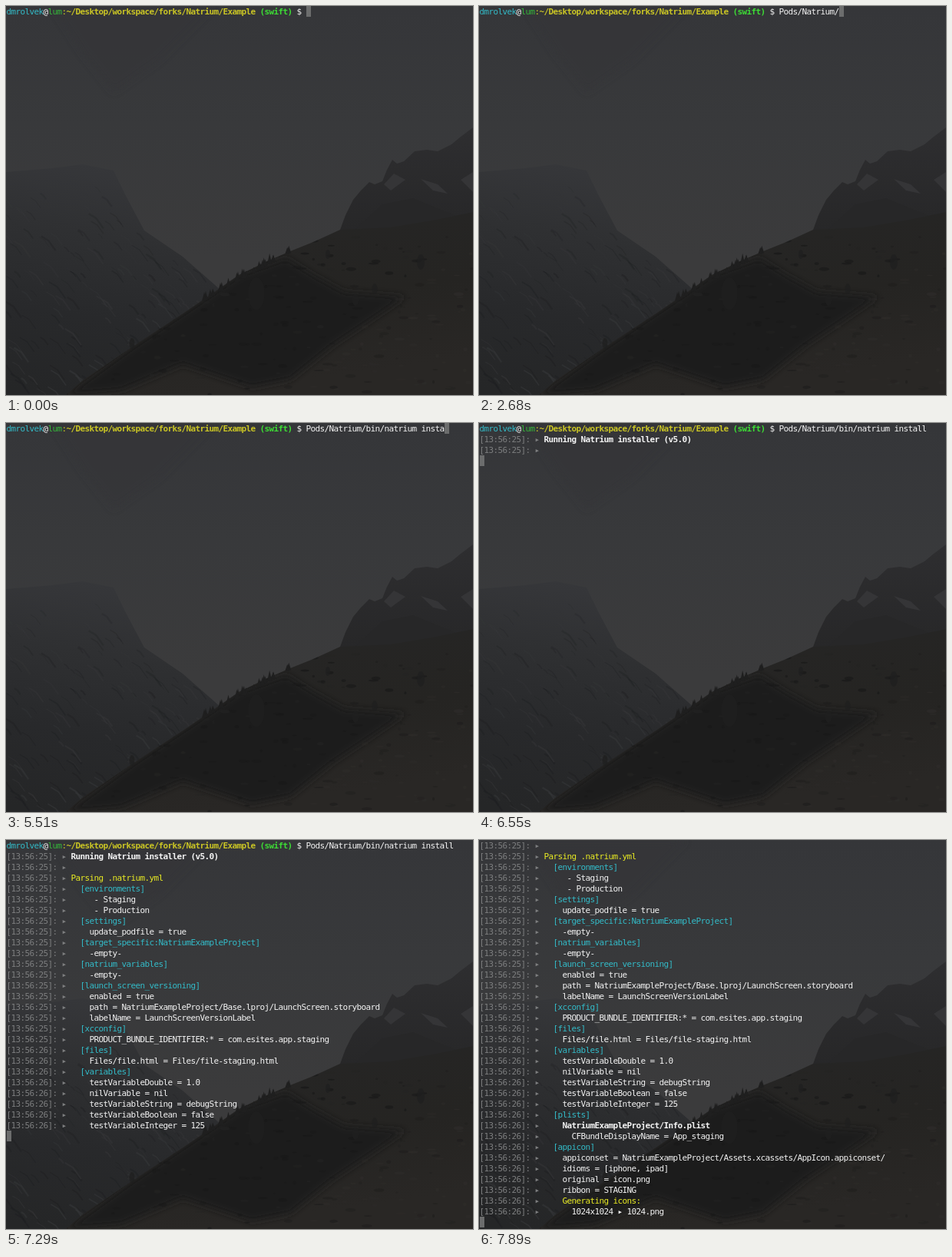
An HTML page for the animation above (8000 ms loop, 608x506 px).

```html
<!DOCTYPE html>
<html lang="en">
<head>
<meta charset="utf-8">
<title>Terminal session</title>
<style>
html, body { margin: 0; width: 100%; height: 100%; overflow: hidden; background: #38393b; }
svg { display: block; width: 608px; height: 506px; }
text { font: 11px "DejaVu Sans Mono", "Liberation Mono", monospace; white-space: pre; }
.bold { font-weight: bold; }
</style>
</head>
<body>
<svg viewBox="0 0 608 506">
  <defs>
    <linearGradient id="sky" x2="0" y2="1">
      <stop offset="0" stop-color="#353639"/>
      <stop offset=".3" stop-color="#38393b"/>
      <stop offset=".65" stop-color="#3b3b3c"/>
    </linearGradient>
    <linearGradient id="haze" x1=".4" y1="0" x2=".25" y2="1">
      <stop offset="0" stop-color="#36373a"/>
      <stop offset=".3" stop-color="#2f3032"/>
      <stop offset=".65" stop-color="#28292b"/>
      <stop offset="1" stop-color="#252627"/>
    </linearGradient>
    <linearGradient id="peak" x2="0" y2="1">
      <stop offset="0" stop-color="#2e2e30"/>
      <stop offset="1" stop-color="#262627"/>
    </linearGradient>
    <linearGradient id="slope" x2=".3" y2="1">
      <stop offset="0" stop-color="#262626"/>
      <stop offset=".6" stop-color="#252422"/>
      <stop offset="1" stop-color="#292725"/>
    </linearGradient>
    <filter id="soft" x="-20%" y="-20%" width="140%" height="140%"><feGaussianBlur stdDeviation="5"/></filter>
    <clipPath id="leftClip"><path d="M0 232L60 226L130 230L155 250L180 292L230 326L280 370L85 506H0Z"/></clipPath>
    <clipPath id="slopeClip"><path id="ridge" d="M78 506L100 487L165 443L200 420L232 399L270 373L303 350L340 332L370 319L400 307L435 291L500 288L560 278L608 268V506Z"/></clipPath>
  </defs>
  <rect width="608" height="506" fill="url(#sky)"/>
  <path d="M60 0L100 62L140 112L200 70L270 0Z" fill="#343539" opacity=".6" filter="url(#soft)"/>
  <path d="M0 216L60 211L100 206L140 214L155 245L180 292L230 326L280 370L200 430L85 506H0Z" fill="url(#haze)"/>
  <g id="streaks" clip-path="url(#leftClip)" fill="none"></g>
  <path d="M608 158L592 170L580 180L562 189L548 187L532 189L518 202L509 205L503 200L496 213L490 228L480 232L473 229L462 240L452 252L442 272L435 291L430 310L608 300Z" fill="url(#peak)"/>
  <path d="M540 225L562 232L575 244L556 240ZM592 226L608 216V242ZM492 232L505 218L520 226L501 240Z" fill="#353537"/>
  <path d="M455 290L490 258L530 250L608 282V300H450Z" fill="#272728"/>
  <use href="#ridge" fill="url(#slope)"/>
  <g clip-path="url(#slopeClip)">
    <path d="M78 506L165 443L270 373L303 350L365 328L400 350L440 372L520 378L470 412L425 442L370 486L320 496L230 466L150 500Z" fill="#1b1b1b" filter="url(#soft)"/>
    <g id="scrub"></g>
  </g>
  <g id="trees" fill="#1f1f1f"></g>
  <rect id="cursor" width="6" height="14" fill="#6c6d6d"/>
  <g id="screen"></g>
</svg>
<script>
const NS = 'http://www.w3.org/2000/svg';
const LOOP = 8000, CELL = 6, ROW = 14, VISIBLE = 36;
const WHITE = '#f4f4f4', GREY = '#7d7e7f', CYAN = '#33bbc8', YELLOW = '#eaec23';
const $ = id => document.getElementById(id);

function add(parent, tag, attrs) {
  const el = document.createElementNS(NS, tag);
  for (const key in attrs) el.setAttribute(key, attrs[key]);
  return parent.appendChild(el);
}

// Scenery
let seed = 7;
const rand = (a, b) => {
  seed = (seed * 16807) % 2147483647;
  return a + (b - a) * seed / 2147483647;
};

for (let i = 0; i < 230; i++) {
  const x = rand(-10, 260), y = rand(235, 506), len = rand(5, 22);
  add($('streaks'), 'path', {
    d: `M${x} ${y}l${len * .5} ${len * .3}l${len * .5} ${len * .7}`,
    stroke: rand(0, 1) < .55 ? '#1f2022' : '#363739',
    'stroke-width': rand(.6, 2.4),
    opacity: rand(.15, .3) + (y - 235) / 700
  });
}
for (let i = 0; i < 240; i++) {
  const x = rand(120, 608), y = rand(300, 506);
  const dark = x + (y - 400) * .9 < 480;
  add($('scrub'), 'ellipse', {
    cx: x, cy: y, rx: rand(1.5, 7), ry: rand(.7, 2.5),
    fill: dark ? (rand(0, 1) < .7 ? '#181818' : '#242423') : (rand(0, 1) < .4 ? '#1f1e1d' : '#2e2c2a'),
    opacity: rand(.3, .7)
  });
}
for (let i = 0; i < 26; i++) {
  const x = rand(255, 372), base = 378 - (x - 262) * .56, h = rand(4, 11);
  add($('trees'), 'path', { d: `M${x - 3} ${base + 3}L${x} ${base - h}L${x + 3} ${base + 3}Z` });
}
for (const [x, y, h] of [[326, 395, 42], [540, 343, 20], [419, 329, 12], [164, 446, 14], [455, 390, 16], [480, 375, 14]]) {
  add($('trees'), 'ellipse', { cx: x, cy: y - h / 2, rx: h / 4, ry: h / 2, opacity: .8 });
}

// Terminal
function print(row, col, text, fill, bold) {
  const x = [...text].map((_, i) => (col + i) * CELL + .4).join(' ');
  const el = add(row, 'text', { x, y: 11, fill });
  if (bold) el.setAttribute('class', 'bold');
  el.textContent = text;
  return el;
}

const COMMAND = 'Pods/Natrium/bin/natrium install';
const LOG = [
  [14, 'Running Natrium installer (v5.0)', WHITE, true],
  [14, ''],
  [14, 'Parsing .natrium.yml', YELLOW],
  [16, '[environments]', CYAN],
  [19, '- Staging'],
  [19, '- Production'],
  [16, '[settings]', CYAN],
  [18, 'update_podfile = true'],
  [16, '[target_specific:NatriumExampleProject]', CYAN],
  [18, '-empty-'],
  [16, '[natrium_variables]', CYAN],
  [18, '-empty-'],
  [16, '[launch_screen_versioning]', CYAN],
  [18, 'enabled = true'],
  [18, 'path = NatriumExampleProject/Base.lproj/LaunchScreen.storyboard'],
  [18, 'labelName = LaunchScreenVersionLabel'],
  [16, '[xcconfig]', CYAN],
  [18, 'PRODUCT_BUNDLE_IDENTIFIER:* = com.esites.app.staging'],
  [16, '[files]', CYAN],
  [18, 'Files/file.html = Files/file-staging.html'],
  [16, '[variables]', CYAN],
  [18, 'testVariableDouble = 1.0'],
  [18, 'nilVariable = nil'],
  [18, 'testVariableString = debugString'],
  [18, 'testVariableBoolean = false'],
  [18, 'testVariableInteger = 125'],
  [16, '[plists]', CYAN],
  [18, 'NatriumExampleProject/Info.plist', WHITE, true],
  [20, 'CFBundleDisplayName = App_staging'],
  [16, '[appicon]', CYAN],
  [18, 'appiconset = NatriumExampleProject/Assets.xcassets/AppIcon.appiconset/'],
  [18, 'idioms = [iphone, ipad]'],
  [18, 'original = icon.png'],
  [18, 'ribbon = STAGING'],
  [18, 'Generating icons:', YELLOW],
  [20, '1024x1024 ▸ 1024.png']
];
const SECOND_TICK = 18;

// [time, characters typed] and [time, lines on screen]
const KEYS = [[0, 0], [740, 1], [890, 2], [1040, 3], [1190, 4], [1930, 5], [2230, 6], [2530, 7], [2680, 13],
  [3870, 14], [4170, 17], [4470, 18], [4620, 19], [4770, 25], [5360, 28], [5510, 30], [5660, 31], [5810, 32]];
const OUTPUT = [[0, 1], [6550, 3], [6700, 19], [7290, 27], [7590, 30], [7740, 35], [7890, 37]];

const newRow = i => add($('screen'), 'g', { transform: `translate(0 ${i * ROW})` });
const rows = [newRow(0)];
const PROMPT = [
  ['dmrolvek', CYAN], ['@', WHITE], ['lum', '#35b83a'], [':', '#c9c424'],
  ['~/Desktop/workspace/forks/Natrium/Example', '#cbc625', true],
  [' ', WHITE], ['(swift)', '#3ddc35', true], [' $ ', WHITE]
];
let start = 0;
for (const [text, fill, bold] of PROMPT) {
  print(rows[0], start, text, fill, bold);
  start += text.length;
}
const typed = print(rows[0], start, COMMAND, WHITE);

LOG.forEach(([col, text, fill = WHITE, bold], i) => {
  const row = newRow(i + 1);
  print(row, 0, `[13:56:${i < SECOND_TICK ? 25 : 26}]: ▸`, GREY);
  if (text) print(row, col, text, fill, bold);
  rows.push(row);
});

const valueAt = (steps, t) => steps.filter(([at]) => at <= t).pop()[1];

function draw(t) {
  const count = valueAt(KEYS, t), lines = valueAt(OUTPUT, t);
  const scroll = Math.max(0, lines + 1 - VISIBLE);
  typed.textContent = COMMAND.slice(0, count);
  rows.forEach((row, i) => row.setAttribute('visibility', i >= scroll && i < lines ? 'visible' : 'hidden'));
  $('screen').setAttribute('transform', `translate(0 ${-scroll * ROW})`);
  const running = lines > 1;
  $('cursor').setAttribute('x', 1 + (running ? 0 : start + count) * CELL);
  $('cursor').setAttribute('y', running ? (lines - scroll) * ROW : 0);
}

const begin = performance.now();
function frame() {
  draw((performance.now() - begin) % LOOP);
  requestAnimationFrame(frame);
}
frame();
</script>
</body>
</html>
```
